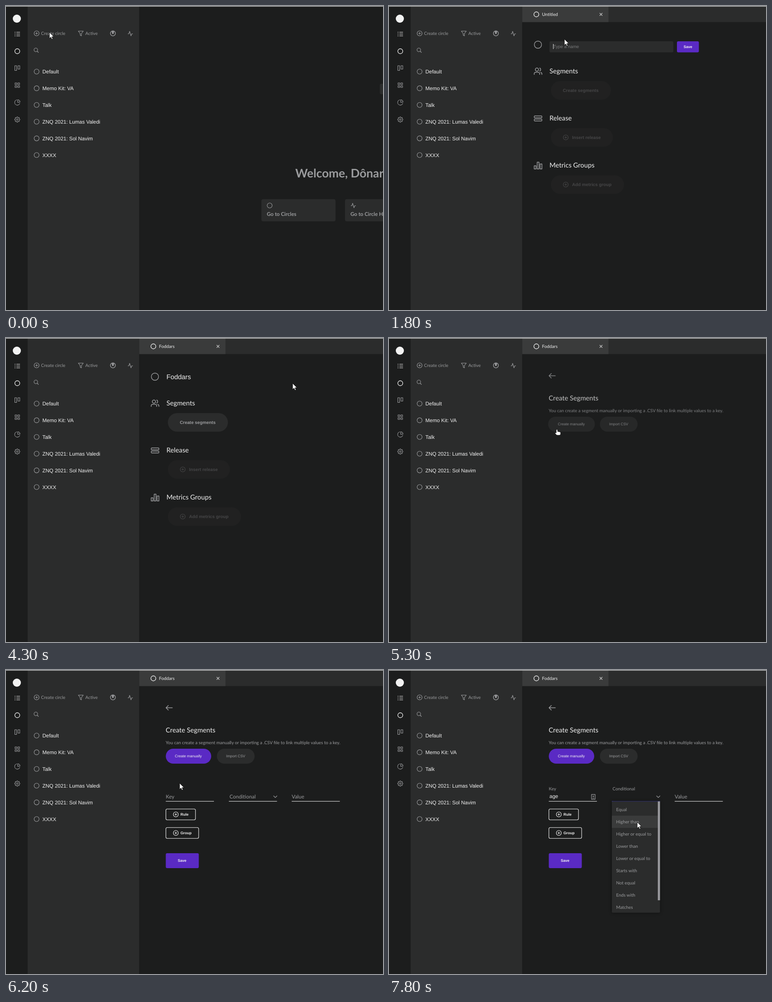
An HTML page with a canvas that plays this animation: 834 px wide and 672 px high, repeating every 8 s.

```html
<!DOCTYPE html>
<html lang="en">
<head>
<meta charset="utf-8">
<title>Create a segment</title>
<style>
html, body { margin: 0; width: 100%; height: 100%; overflow: hidden; background: #1c1d1d }
canvas { display: block }
</style>
</head>
<body>
<canvas id="stage" width="834" height="672"></canvas>
<script>
const c = document.getElementById('stage').getContext('2d');
c.textRendering = 'geometricPrecision';
const BG = '#1c1d1d', PANEL = '#2b2c2c', RAISED = '#3a3b3b', GREY = '#9b9c9e', WHITE = '#f2f2f2', PURPLE = '#5a2ac4';
const LOOP = 8000, SCALE = 0.82, NAME = 'Foddars';
const SANS = '"Liberation Sans", Arial, sans-serif', LATO = 'Lato, sans-serif';

const CIRCLE = 'M5.5 0A5.5 5.5 0 1 1 -5.5 0A5.5 5.5 0 1 1 5.5 0';
const PLUS = CIRCLE + 'M-2.8 0H2.8M0 -2.8V2.8';
const PULSE = 'M-5.5 .5H-3.2L-1.5 -5 1.5 5 3.2 .5H5.5';
const BACK = 'M7.5 0H-7M-1.5 -5.5L-7 0 -1.5 5.5';
const CHEVRON = 'M-4 -2L0 2 4 -2';
const CROSS = 'M-3 -3L3 3M3 -3L-3 3';
const USERS = 'M-2.5 -7A3.6 3.6 0 1 1 -2.6 -7M-8.5 8V5.5Q-8.5 2.5 -5 2.5H0Q3.5 2.5 3.5 5.5V8M3 -7A3.6 3.6 0 0 1 3 0M5.5 2.7Q8.5 3.5 8.5 6V8';
const LAYERS = 'M-7 -5H7Q8.5 -5 8.5 -3.5V-2Q8.5 -.8 7 -.8H-7Q-8.5 -.8 -8.5 -2V-3.5Q-8.5 -5 -7 -5ZM-7 2H7Q8.5 2 8.5 3.5V4.8Q8.5 6.2 7 6.2H-7Q-8.5 6.2 -8.5 4.8V3.5Q-8.5 2 -7 2Z';
const BARS = 'M-8.5 1H-4.5V8H-8.5ZM-2 -7H2V8H-2ZM4.5 -3H8.5V8H4.5Z';
const ARROW = 'M0 0V13.8L3.2 10.9 5.3 15.6 7.6 14.6 5.5 10H9.8Z';
const HAND = 'M-1.6 1Q0 -1 1.6 1V4.6L6.5 5.4Q8.3 5.8 8.3 7.5V10Q8.3 13 5.5 13H1Q-1 13 -2 11.3L-4.3 8.4Q-4.2 6.2 -1.6 7.6Z';

// time, x, y, shape; positions are linear between rows
const POINTER = [
  [0, 96, 58, ARROW], [300, 96, 58, HAND], [700, 96, 58, HAND], [900, 290, 64, HAND],
  [1000, 419, 68, HAND], [1300, 357, 47, ARROW], [1400, 357, 47, ARROW], [1600, 388, 75, HAND],
  [1700, 388, 75, HAND], [1800, 388, 73, ARROW], [2200, 600, 82, ARROW], [3400, 600, 82, ARROW],
  [3700, 652, 92, HAND], [4100, 652, 92, ARROW], [4300, 634, 100, ARROW], [4700, 420, 188, HAND],
  [4900, 420, 188, HAND], [5200, 371.5, 202, HAND], [5500, 371.5, 202, HAND], [5700, 385, 190, HAND],
  [5900, 385, 190, HAND], [6100, 384, 230, ARROW], [6200, 384, 250, ARROW], [6400, 390, 278, ARROW],
  [6600, 390, 278, ARROW], [6900, 531, 281, ARROW], [7000, 531, 281, ARROW], [7300, 498, 276, ARROW],
  [7700, 498, 276, ARROW], [7800, 549, 336, ARROW], [LOOP, 549, 336, ARROW]
];

const ramp = (t, start, length) => Math.min(1, Math.max(0, (t - start) / length));
const typed = (word, t, times) => word.slice(0, times.filter(k => t >= k).length);

function text(str, x, y, size, color = GREY, font = LATO, weight = 400) {
  c.font = `${weight} ${size * SCALE}px ${font}`;
  c.fillStyle = color;
  c.fillText(str, x, y);
}

function box(x, y, w, h, color, r = 0) {
  c.beginPath();
  c.roundRect(x, y, w, h, r);
  c.fillStyle = color;
  c.fill();
}

function icon(path, x, y, color = GREY, width = 1.1, fill) {
  const p = new Path2D(path);
  c.save();
  c.translate(x, y);
  if (fill) { c.fillStyle = fill; c.fill(p); }
  c.strokeStyle = color;
  c.lineWidth = width;
  c.lineJoin = 'round';
  c.stroke(p);
  c.restore();
}

function faded(alpha, draw) {
  c.save();
  c.globalAlpha *= alpha;
  draw();
  c.restore();
}

function sidebar() {
  box(48, 0, 246.5, 672, PANEL);
  box(15, 19, 18, 18, WHITE, 9);
  icon('M-2 -4H6M-2 0H6M-2 4H6M-6 -4H-4M-6 0H-4M-6 4H-4', 25, 62, WHITE, 1.2);
  icon(CIRCLE, 25, 100, WHITE, 1.3);
  icon('M-5.5 -5H-1.5V5.5H-5.5ZM1.5 -5H5.5V2.5H1.5Z', 25, 137);
  icon('M-5 -5H-1.2V-1.2H-5ZM1.2 -5H5V-1.2H1.2ZM-5 1.2H-1.2V5H-5ZM1.2 1.2H5V5H1.2Z', 25, 175);
  icon('M0 -5.5A5.8 5.8 0 1 0 5.5 2M1.2 -5.8A5 5 0 0 1 6 -.6L.8 0Z', 25, 213);
  let gear = '';
  for (let i = 0; i <= 48; i++) {
    const a = i * Math.PI / 24, r = 5.2 + 0.8 * Math.cos(a * 8);
    gear += (i ? 'L' : 'M') + r * Math.cos(a) + ' ' + r * Math.sin(a);
  }
  icon(gear + 'M1.8 0A1.8 1.8 0 1 1 -1.8 0A1.8 1.8 0 1 1 1.8 0', 25, 251);

  icon(PLUS, 67.7, 60.5);
  text('Create circle', 77.5, 64, 12);
  icon('M-5.5 -5H5.5L1.3 .5V5.5L-1.3 4V.5Z', 165.5, 60.5);
  text('Active', 175.5, 64, 12);
  icon(CIRCLE, 236.5, 60.5, GREY, 1.4);
  icon('M-2 -4H2L1 1H-1Z', 236.5, 60.5, GREY, 1, GREY);
  icon(PULSE, 275, 61);
  icon('M3 -1A4 4 0 1 1 -5 -1A4 4 0 1 1 3 -1M2 2L5 5', 67, 98);
  ['Default', 'Memo Kit: VA', 'Talk', 'ZNQ 2021: Lumas Valedi', 'ZNQ 2021: Sol Navim', 'XXXX'].forEach((label, i) => {
    const y = 145 + i * 36.9;
    icon(CIRCLE, 67.7, y);
    text(label, 80.5, y + 4.3, 14, WHITE, SANS);
  });
}

function welcome() {
  text('Welcome, Dônara', 640, 379, 32, GREY, LATO, 700);
  box(827, 172, 20, 23, PANEL, 3);
  [[565, CIRCLE, 'Go to Circles'], [750, PULSE, 'Go to Circle History']].forEach(([x, path, label]) => {
    box(x, 427, 164, 49, PANEL, 4);
    icon(path, x + 18.3, 441);
    text(label, x + 12, 463.5, 14, GREY, LATO, 700);
  });
}

function tab(label) {
  box(294.5, 0, 540, 35.5, PANEL);
  box(294.5, 0, 191, 35.5, RAISED);
  icon(CIRCLE, 326, 18.5, WHITE, 1.3);
  text(label, 338.5, 22, 12, WHITE);
  icon(CROSS, 469, 18.5, '#c8c8c8');
}

function pill(label, y, width, plus) {
  box(358, y, width, 41, PANEL, 20.5);
  if (plus) icon(PLUS, 391, y + 20.5);
  text(label, plus ? 405 : 384.5, y + 23.8, 12, GREY, SANS, 700);
}

function nameField(t, saved) {
  icon('M8 0A8 8 0 1 1 -8 0A8 8 0 1 1 8 0', 329.5, 85.5, GREY, 1.4);
  if (t < 1800 || saved) {
    text(saved ? NAME : 'Type a name', 355, 90.5, 18, saved ? WHITE : '#858687', SANS);
    return;
  }
  box(355, 78, 274, 24.5, PANEL, 3);
  const value = typed(NAME, t, [2200, 2600, 2700, 3000, 3100, 3100, 3200]);
  text(value || 'Type a name', 363.5, 93, 12, value ? WHITE : '#777879', SANS);
  box(363 + (value ? c.measureText(value).width : 0), 84, 1, 11, WHITE);
  box(637, 78, 48.5, 24.5, PURPLE, 3);
  text('Save', 651.8, 93.3, 10, WHITE, SANS, 700);
}

function circlePage(t) {
  const saved = t >= 4000;
  faded(ramp(t, 800, 200), () => nameField(t, saved));
  [
    ['Segments', 'Create segments', 144, 133, USERS, 850],
    ['Release', 'Insert release', 248, 137.5, LAYERS, 850],
    ['Metrics Groups', 'Add metrics group', 352.3, 162, BARS, 900]
  ].forEach(([title, button, y, width, path, start], i) => {
    faded(ramp(t, start, 190), () => {
      icon(path, 329.8, y, GREY, 1.5);
      text(title, 355, y + 4.6, 18, WHITE);
    });
    faded(ramp(t, 900, 300) * (saved && !i ? 1 : 0.3), () => pill(button, y + 22, width, i > 0));
  });
}

function field(label, x, lift, focused) {
  text(label, x + (label === 'Conditional' ? 1.5 : 0), 284 - 18 * lift, 14 - 2 * lift, GREY);
  box(x, 289.7, 106.5, 1, focused ? '#5655d8' : WHITE);
}

function outlined(label, y, width) {
  c.beginPath();
  c.roundRect(353.7, y, width, 24, 3);
  c.strokeStyle = WHITE;
  c.lineWidth = 1.1;
  c.stroke();
  icon(PLUS, 375.7, y + 12, WHITE);
  text(label, 386, y + 14.8, 10, WHITE, SANS, 700);
}

function dropdown(t) {
  c.save();
  c.shadowColor = '#0008';
  c.shadowBlur = 6;
  box(493, 290.5, 106.5, 246, PANEL, 2);
  c.restore();
  box(493, t < 7800 ? 295 : 322, 102, 27, RAISED);
  ['Equal', 'Higher than', 'Higher or equal to', 'Lower than', 'Lower or equal to',
    'Starts with', 'Not equal', 'Ends with', 'Matches'].forEach((option, i) =>
    text(option, 502.5, 312 + i * 27.05, 12));
  box(594.7, 290.5, 4.8, 218.5, '#98999d');
}

function form(t) {
  field('Key', 353.5, ramp(t, 6400, 200), t >= 6500 && t < 7300);
  text(typed('age', t, [6600, 6700, 6800]), 355, 283, 14, WHITE, SANS);
  if (t >= 6500) icon('M-4 -5.3H4V5.3H-4ZM-2 3H2M0 -3V1M-1.5 -1H1.5', 452, 280.5, GREY, 1.2);
  field('Conditional', 493, ramp(t, 7200, 200), t >= 7300);
  icon(CHEVRON, 595.7, 280);
  field('Value', 632, 0, false);
  outlined('Rule', 307.3, 65.5);
  outlined('Group', 348.3, 72.5);
  box(353.5, 405, 73, 33, PURPLE, 3);
  text('Save', 380, 424.3, 10, WHITE, SANS, 700);
  if (t >= 7400) dropdown(t);
}

function segmentsPage(t) {
  const manual = t >= 5800, grow = t >= 5200 && t < 6000 ? 1.5 : 0;
  faded(ramp(t, 5000, 380), () => {
    icon(BACK, 361, 83.5, GREY, 1.5);
    text('Create Segments', 353.3, 137.5, 18, WHITE);
    text('You can create a segment manually or importing a .CSV file to link multiple values to a key.', 353.3, 164, 12);
    box(353.5 - grow, 174, 100.5 + 2 * grow, 33, manual ? PURPLE : PANEL, 16.5);
    text('Create manually', 373.5, 193, 10, manual ? WHITE : GREY, SANS);
    box(466.5, 174, 83.5, 33, PANEL, 16.5);
    text('Import CSV', 487, 193, 10, GREY, SANS);
  });
  faded(ramp(t, 5800, 300), () => form(t));
}

function pointer(t) {
  const i = POINTER.findIndex((row, n) => n === POINTER.length - 1 || t < POINTER[n + 1][0]);
  const a = POINTER[i], b = POINTER[i + 1] || a;
  const k = ramp(t, a[0], b[0] - a[0] || 1);
  icon(a[3], a[1] + (b[1] - a[1]) * k, a[2] + (b[2] - a[2]) * k, '#111', 1, '#fff');
}

function frame(now) {
  const t = Math.floor(now % LOOP / 100) * 100;
  box(0, 0, 834, 672, BG);
  if (t < 900) {
    welcome();
  } else {
    tab(t < 4000 ? 'Untitled' : NAME);
    if (t < 5000) circlePage(t); else segmentsPage(t);
  }
  sidebar();
  box(0, 0, 834, 1.3, '#c9cac9');
  pointer(t);
  requestAnimationFrame(frame);
}
requestAnimationFrame(frame);
</script>
</body>
</html>
```
